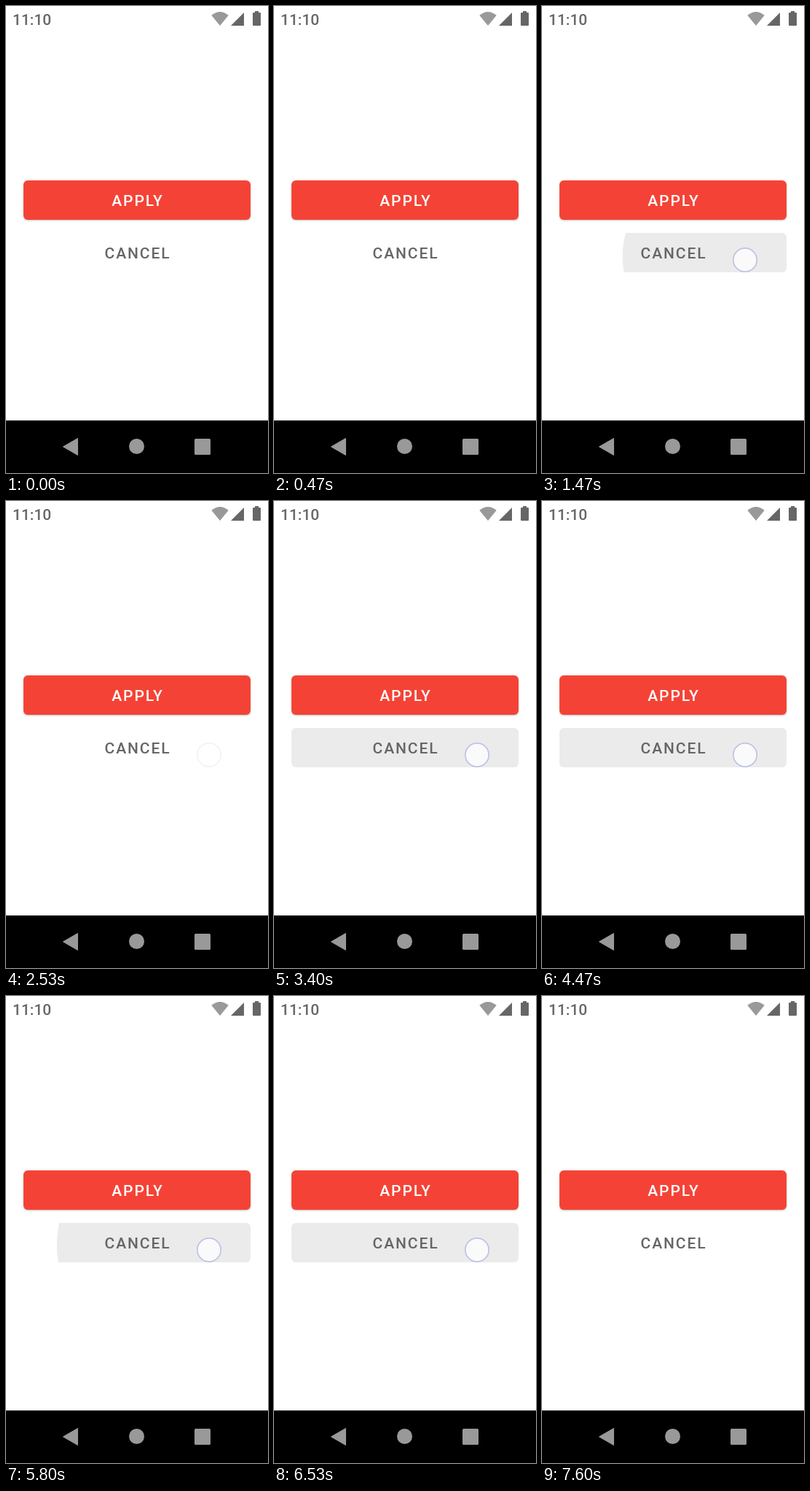
Write an HTML page that moves like this. It is 360x640 px and loops after 8070 ms.

```html
<!DOCTYPE html>
<html lang="en">
<head>
<meta charset="utf-8">
<title>Button ripple</title>
<style>
  html, body { margin: 0; width: 100%; height: 100%; overflow: hidden; background: #fff; }
  svg { display: block; width: 360px; height: 640px; }
  text { font: 500 21px Roboto, sans-serif; fill: #666; }
  .label { text-anchor: middle; letter-spacing: 1.875px; }
  .raised { filter: drop-shadow(0 1px 1px rgba(0, 0, 0, .25)); }
</style>
</head>
<body>
<svg viewBox="0 0 360 640">
  <defs>
    <clipPath id="bounds"><rect x="24" y="311" width="312" height="54" rx="6"/></clipPath>
  </defs>

  <!-- status bar -->
  <text x="9" y="26">11:10</text>
  <path d="M294 27 L282.3 12.8 Q294 3.4 305.7 12.8 Z" fill="#999"/>
  <path d="M327 9 V27 H309 Z" fill="#666"/>
  <path d="M342 7 H347 V9 H349 Q350 9 350 10 V26 Q350 27 349 27 H340 Q339 27 339 26 V10 Q339 9 340 9 H342 Z" fill="#666"/>

  <!-- buttons -->
  <rect class="raised" x="24" y="239" width="312" height="54" rx="6" fill="#f44336"/>
  <text class="label" x="181" y="274" style="fill:#fff">APPLY</text>
  <g clip-path="url(#bounds)"><circle id="ripple" fill="#ebebeb" opacity="0"/></g>
  <text class="label" x="181" y="346">CANCEL</text>

  <!-- touch marker -->
  <g id="touch" opacity="0">
    <circle cx="279" cy="348" r="17" fill="#fff" fill-opacity=".75"/>
    <circle cx="279" cy="348" r="16.2" fill="none" stroke="#8c96d2" stroke-opacity=".55" stroke-width="1.7"/>
  </g>

  <!-- navigation bar -->
  <rect y="568" width="360" height="72"/>
  <g fill="#999">
    <path d="M78.5 604 L98.5 592.5 V615.5 Z" stroke="#999" stroke-linejoin="round"/>
    <circle cx="179.5" cy="603.5" r="10.5"/>
    <rect x="259" y="593" width="22" height="22" rx="1.5"/>
  </g>
</svg>
<script>
const LOOP = 8070, FPS = 15;
const presses = [[1392, 2310], [2840, 3580], [4100, 5180], [5699, 6515]]; // down, up in ms
const ripple = document.getElementById('ripple');
const touch = document.getElementById('touch');

const clamp = v => Math.min(1, Math.max(0, v));
const mix = (a, b, k) => a + (b - a) * k;
const bezier = (a, b, s) => 3 * a * s * (1 - s) ** 2 + 3 * b * s * s * (1 - s) + s ** 3;

// cubic-bezier(.4, 0, .2, 1)
function ease(x) {
  let lo = 0, hi = 1;
  for (let i = 0; i < 24; i++) {
    const mid = (lo + hi) / 2;
    if (bezier(.4, .2, mid) < x) lo = mid; else hi = mid;
  }
  return bezier(0, 1, hi);
}

function set(el, attrs) {
  for (const name in attrs) el.setAttribute(name, attrs[name]);
}

function draw(now) {
  const t = Math.floor(now % LOOP * FPS / 1000) * 1000 / FPS;
  const [down, up] = presses.findLast(p => t >= p[0]) || [Infinity, Infinity];
  const age = t - down, since = t - up;
  const active = age >= 0;
  const k = ease(clamp(age / 225));
  set(touch, { opacity: active ? clamp(1 - since / 200) : 0 });
  set(ripple, {
    cx: mix(279, 180, k),
    cy: mix(348, 338, k),
    r: mix(94, 159, k),
    opacity: active ? clamp(age / 75) * clamp(1 - since / 150) : 0
  });
}

function tick() {
  draw(performance.now());
  requestAnimationFrame(tick);
}
tick();
</script>
</body>
</html>
```
